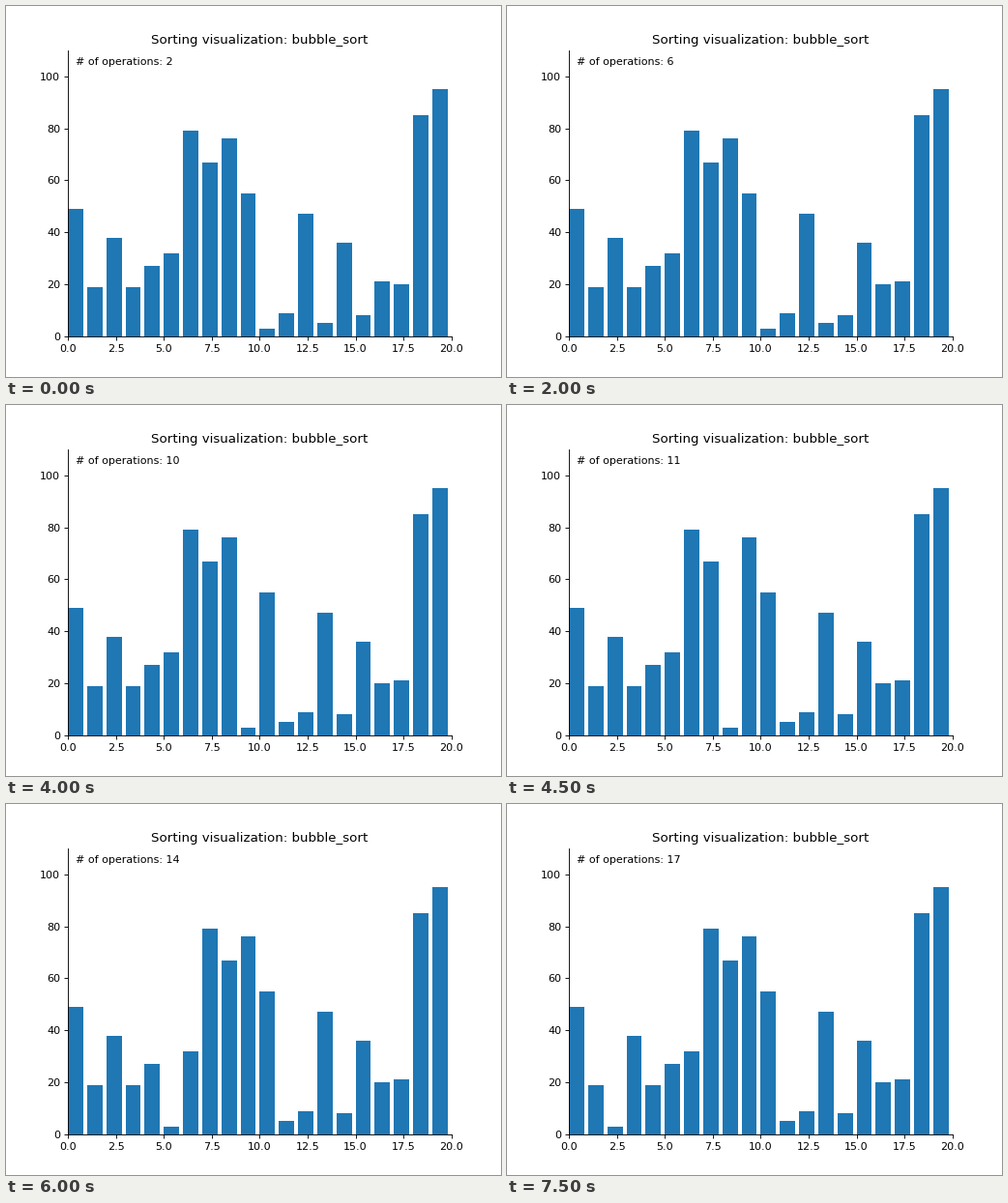
Write a matplotlib script that moves like this. It is 512 px wide and 384 px high and loops after 8000 ms.

```python
import matplotlib.pyplot as plt
from matplotlib.animation import FuncAnimation

START = [49, 19, 38, 19, 27, 32, 79, 67, 76, 55,
         3, 9, 47, 5, 36, 8, 21, 20, 85, 95]
N = len(START)
FIRST_OP = 2
FRAMES = 16


def values_after(ops):
    """Bar heights after the first pass has compared `ops` pairs, right to left."""
    vals = START.copy()
    for k in range(1, ops + 1):
        j = N - k
        if vals[j - 1] > vals[j]:
            vals[j - 1], vals[j] = vals[j], vals[j - 1]
    return vals


fig, ax = plt.subplots(figsize=(6.4, 4.8), dpi=80)
bars = ax.bar(range(N), START, align="edge")
ax.set_xlim(0, N)
ax.set_ylim(0, 110)
ax.spines[["top", "right"]].set_visible(False)
ax.set_title("Sorting visualization: bubble_sort")
label = ax.text(0.02, 0.95, "", transform=ax.transAxes)


def update(frame):
    ops = FIRST_OP + frame
    for bar, value in zip(bars, values_after(ops)):
        bar.set_height(value)
    label.set_text(f"# of operations: {ops}")
    return [*bars, label]


anim = FuncAnimation(fig, update, frames=FRAMES, interval=500,
                     repeat=True, repeat_delay=0, blit=False)
plt.show()
```
